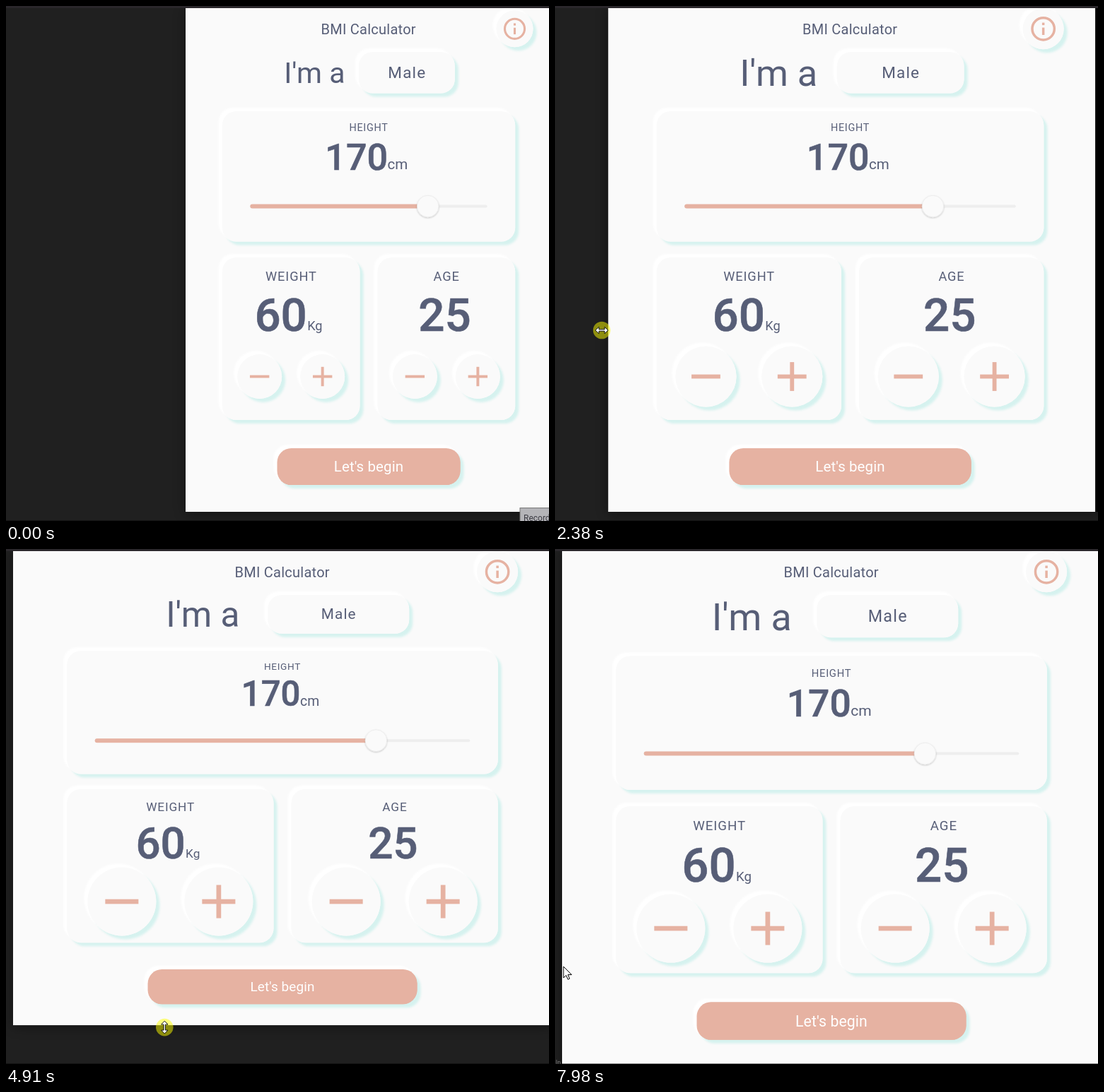
Recreate the animation shown at these times as an HTML page. Size 768 by 729 pixels, loop 8000 ms.

```html
<!DOCTYPE html>
<html lang="en">
<head>
<meta charset="utf-8">
<title>BMI Calculator</title>
<style>
  html, body { margin: 0; width: 100%; height: 100%; overflow: hidden; background: #202020; }
  svg { display: block; width: 768px; height: 729px; }
  text { font-family: Roboto, "Open Sans", sans-serif; fill: #575e77; text-anchor: middle; }
  .bold { font-weight: 500; stroke: #575e77; stroke-width: .6px; }
  .start { text-anchor: start; }
  .end { text-anchor: end; }
  .soft { fill: #fafafa; filter: url(#soft); }
  .accent { fill: #e6b2a2; }
</style>
</head>
<body>
<svg viewBox="0 0 768 729">
  <defs>
    <filter id="soft" filterUnits="userSpaceOnUse" x="-40" y="-40" width="860" height="830" color-interpolation-filters="sRGB">
      <feDropShadow in="SourceGraphic" dx="5" dy="5" stdDeviation="1.8" flood-color="#d6f2ef" result="low"/>
      <feDropShadow in="SourceGraphic" dx="-5" dy="-5" stdDeviation="1.8" flood-color="#fff" result="high"/>
      <feMerge><feMergeNode in="low"/><feMergeNode in="high"/></feMerge>
    </filter>
    <filter id="shade" x="-20%" y="-20%" width="140%" height="140%"><feGaussianBlur stdDeviation="9"/></filter>
    <filter id="lift" x="-30%" y="-30%" width="160%" height="160%">
      <feDropShadow dx="0" dy="1" stdDeviation="1" flood-color="#000" flood-opacity=".22"/>
    </filter>
  </defs>
  <rect width="768" height="729" fill="#202020"/>
  <rect id="shadow" y="3" fill="#000" opacity=".4" filter="url(#shade)"/>
  <rect id="gap" y="3" fill="#000"/>
  <rect id="page" y="3" fill="#fafafa"/>

  <text id="title">BMI Calculator</text>
  <circle id="infoDisk" class="soft"/>
  <g id="infoIcon" class="accent">
    <circle r="9" fill="none" stroke="#e6b2a2" stroke-width="2"/>
    <rect x="-1" y="-5" width="2" height="2"/>
    <rect x="-1" y="-1" width="2" height="6"/>
  </g>
  <text id="intro">I'm a</text>
  <rect id="gender" class="soft" rx="20"/>
  <text id="male">Male</text>

  <rect id="heightCard" class="soft" rx="20"/>
  <text id="heightLabel">HEIGHT</text>
  <text id="heightValue" class="bold end">170</text>
  <text id="heightUnit" class="start">cm</text>
  <rect id="track" height="4" rx="2" fill="#eee"/>
  <rect id="filled" class="accent" height="6" rx="3"/>
  <circle id="thumb" r="15.3" fill="#fafafa" stroke="#e6e6e6" stroke-width=".6" filter="url(#lift)"/>

  <rect id="weightCard" class="soft" rx="20"/>
  <text id="weightLabel">WEIGHT</text>
  <text id="weightValue" class="bold end">60</text>
  <text id="weightUnit" class="start">Kg</text>
  <rect id="ageCard" class="soft" rx="20"/>
  <text id="ageLabel">AGE</text>
  <text id="ageValue" class="bold">25</text>
  <g id="rounds"></g>

  <rect id="begin" class="soft" style="fill:#e6b2a2" rx="20"/>
  <text id="beginText" style="fill:#fff">Let's begin</text>

  <rect width="768" height="3" fill="#2a272b"/>
  <rect y="728" width="768" height="1" opacity=".45"/>
  <text id="corner" class="start" x="1" y="730" font-size="9" style="fill:#777">ln</text>
  <g id="tip">
    <rect x="727" y="710.5" width="60" height="30" fill="#b4b4b8" stroke="#777"/>
    <text class="start" x="732" y="729" font-size="12" style="fill:#3c3c44">Recording</text>
  </g>
  <g id="cursor">
    <circle id="halo" r="12.3" fill="#ff0" opacity=".5"/>
    <path id="arrow" d="M0 0V16L3.8 12.5 6.3 18.3 8.7 17.2 6.3 11.6H11.5Z" fill="#fff" stroke="#000"/>
    <path id="resize" d="M0-9 4.7-4H1.2V4H4.7L0 9-4.7 4H-1.2V-4H-4.7Z" fill="#fff" stroke="#000" stroke-width=".9"/>
  </g>
</svg>
<script>
const LOOP = 8000, TICK = 70, RIGHT = 772, BAR = 56;

const bursts = [[0, 0, 1], [70, 70, 1], [260, 880, 10], [1150, 1150, 1], [1350, 2090, 11],
  [2160, 2930, 12], [2990, 3790, 12], [3850, 4060, 3], [4400, 5160, 12], [5220, 5220, 1],
  [6030, 6800, 12], [6840, 6960, 2], [7220, 7980, 11]];

const leftKeys = [[1280, 254], [1350, 250], [1550, 226], [1800, 190], [2020, 141.5],
  [2090, 124], [2400, 70], [2700, 32], [2860, 21], [3000, 14], [3130, 10]];
const bottomKeys = [[4330, 716], [4400, 712], [4700, 690], [5000, 664], [5150, 651.6],
  [5960, 651.6], [6030, 655], [6300, 692], [6580, 727], [6650, 729.5], [6840, 733.7]];
const cursorX = [[190, 690], [260, 672], [500, 500], [740, 305], [880, 252.5], [1280, 252.5],
  [1800, 181], [2020, 132], [2090, 114], [2400, 61], [2700, 24], [2860, 14.5], [2990, 10],
  [3200, 24], [3500, 150], [3790, 216], [4400, 216], [5160, 229], [6030, 229],
  [6650, 220], [7150, 224], [7220, 218], [7500, 130], [7800, 30], [7980, 12]];
const cursorY = [[190, 745], [260, 718], [500, 610], [740, 492], [880, 466], [1280, 466],
  [2020, 459], [2990, 459], [3200, 480], [3500, 630], [3790, 715], [3850, 718], [4400, 714],
  [5160, 656], [5960, 656], [6030, 668], [6300, 702], [6650, 735], [6800, 745], [7150, 745],
  [7220, 722], [7500, 665], [7800, 605], [7980, 591]];

const $ = id => document.getElementById(id);
const set = (node, attrs) => {
  for (const key in attrs) node.setAttribute(key, attrs[key]);
};
const show = (id, on) => set($(id), { display: on ? "inline" : "none" });

function track(keys, t) {
  if (t <= keys[0][0]) return keys[0][1];
  for (let i = 1; i < keys.length; i++) {
    const [t0, a] = keys[i - 1], [t1, b] = keys[i];
    if (t <= t1) return a + (b - a) * (t - t0) / (t1 - t0);
  }
  return keys[keys.length - 1][1];
}

function lastRefresh(t) {
  const [first, last, count] = bursts.filter(b => b[0] <= t).pop();
  if (count < 2) return first;
  const step = (last - first) / (count - 1);
  return first + step * Math.min(count - 1, Math.floor((t - first) / step + 1e-6));
}

function box(id, x, y, width, height) {
  set($(id), { x, y, width, height });
}
function label(id, x, y, size, spacing = 0) {
  set($(id), { x, y, "font-size": size, "letter-spacing": spacing });
}

const rounds = [0, 1, 2, 3].map(i => {
  const make = (tag, cls) => {
    const node = document.createElementNS("http://www.w3.org/2000/svg", tag);
    node.setAttribute("class", cls);
    return $("rounds").appendChild(node);
  };
  return { plus: i % 2, disk: make("circle", "soft"), bar: make("rect", "accent"), post: make("rect", "accent") };
});

function drawRound({ plus, disk, bar, post }, cx, cy, r, half) {
  const thick = half * 2 / 7;
  set(disk, { cx, cy, r });
  set(bar, { x: cx - half, y: cy - thick / 2, width: half * 2, height: thick });
  set(post, { x: cx - thick / 2, y: cy - half, width: thick, height: plus ? half * 2 : 0 });
}

function drawWindow(t) {
  // The page content is laid out one refresh behind the window frame.
  const left = track(leftKeys, t), lag = track(leftKeys, t - TICK) - left;
  const bottom = track(bottomKeys, t), oldBottom = track(bottomKeys, t - TICK);
  const w = RIGHT - left - lag, k = (oldBottom - BAR) / 660;
  const Y = v => BAR + (v - BAR) * k;
  const grow = Math.max(0, bottom - oldBottom) * 1.5;

  box("shadow", left, 3, RIGHT - left, bottom - 1);
  box("gap", left, 3, RIGHT - left, bottom + grow - 3);
  box("page", left, 3, RIGHT - .65 * lag - left, bottom - 3);

  const mid = left + w / 2, cardL = left + .1 * w, cardR = left + .9 * w;
  const snug = 1 + 1.4 * (k - 1);

  label("title", mid - .3, 40, 20, .25);
  const disk = Math.min(.0502 * w, 29);
  set($("infoDisk"), { cx: cardR - .7, cy: 32.3, r: disk });
  set($("infoIcon"), { transform: `translate(${cardR - .7} 32.3) scale(${disk * .06})` });

  const intro = Math.min(41 + (w - 518) * .086, 52.3 * k);
  label("intro", left + .352 * w, Y(94.8) + .355 * intro, intro);
  box("gender", left + .4727 * w, 65, .2625 * w, Y(123.5) - 65);
  label("male", left + .604 * w + .5, Y(94) + 8 * snug, 22.5 * snug, 1.2 * snug);

  box("heightCard", cardL, Y(149), cardR - cardL, 184.5 * k);
  label("heightLabel", mid, Y(177.3), 14.4 * k, .7 * k);
  label("heightValue", mid + 27 * k, Y(232), 52 * k);
  label("heightUnit", mid + 26.5 * k, Y(231.3), 20.5 * k);
  const x0 = cardL + 39.5, x1 = cardR - 39.5, knob = x0 + .7495 * (x1 - x0), sy = Y(283.5);
  set($("track"), { x: x0, y: sy - 2, width: x1 - x0 });
  set($("filled"), { x: x0, y: sy - 3, width: knob - x0 });
  set($("thumb"), { cx: knob, cy: sy });

  const half = (cardR - cardL - 25) / 2;
  const c1 = cardL + half / 2, c2 = cardR - half / 2;
  box("weightCard", cardL, Y(356), half, 230 * k);
  box("ageCard", cardR - half, Y(356), half, 230 * k);
  label("weightLabel", c1 + .3, Y(389), 18.2 * k, .9 * k);
  label("ageLabel", c2 + .3, Y(389), 18.2 * k, .9 * k);
  label("weightValue", c1 + 22.7 * k, Y(460.3), 65.5 * k);
  label("weightUnit", c1 + 23 * k, Y(459), 18.2 * k);
  label("ageValue", c2 - 2.4 * k, Y(460.3), 65.5 * k);

  const wide = w - 518;
  const r = Math.min(31.5 + wide * .0697, 53.2 * k), icon = 13.7 + wide * .0402;
  const apart = 44.5 + wide * .0984;
  rounds.forEach((round, i) =>
    drawRound(round, (i < 2 ? c1 : c2) + (round.plus ? apart : -apart), Y(524.5), r, icon));

  box("begin", mid - w / 4, Y(626), w / 2, 52 * k);
  label("beginText", mid, Y(652) + 7.4 * snug, 20.5 * snug, .1);
}

function drawCursor(t) {
  const sideways = t >= 800 && t < 3050;
  const vertical = t >= 3700 && t < 7000;
  const x = track(cursorX, t), y = track(cursorY, t);
  set($("cursor"), { transform: `translate(${x} ${y})` });
  set($("resize"), { transform: `rotate(${sideways ? 90 : 0})` });
  show("cursor", t >= 260);
  show("resize", sideways || vertical);
  show("arrow", !sideways && !vertical);
  show("halo", t >= 1350 && t < 3000 || t >= 4400 && t < 6900);
}

function render(now) {
  const t = lastRefresh(now % LOOP);
  drawWindow(t);
  drawCursor(t);
  show("tip", t < 70);
  show("corner", t >= 6500);
}

const start = performance.now();
function tick() {
  render(performance.now() - start);
  requestAnimationFrame(tick);
}
tick();
</script>
</body>
</html>
```
